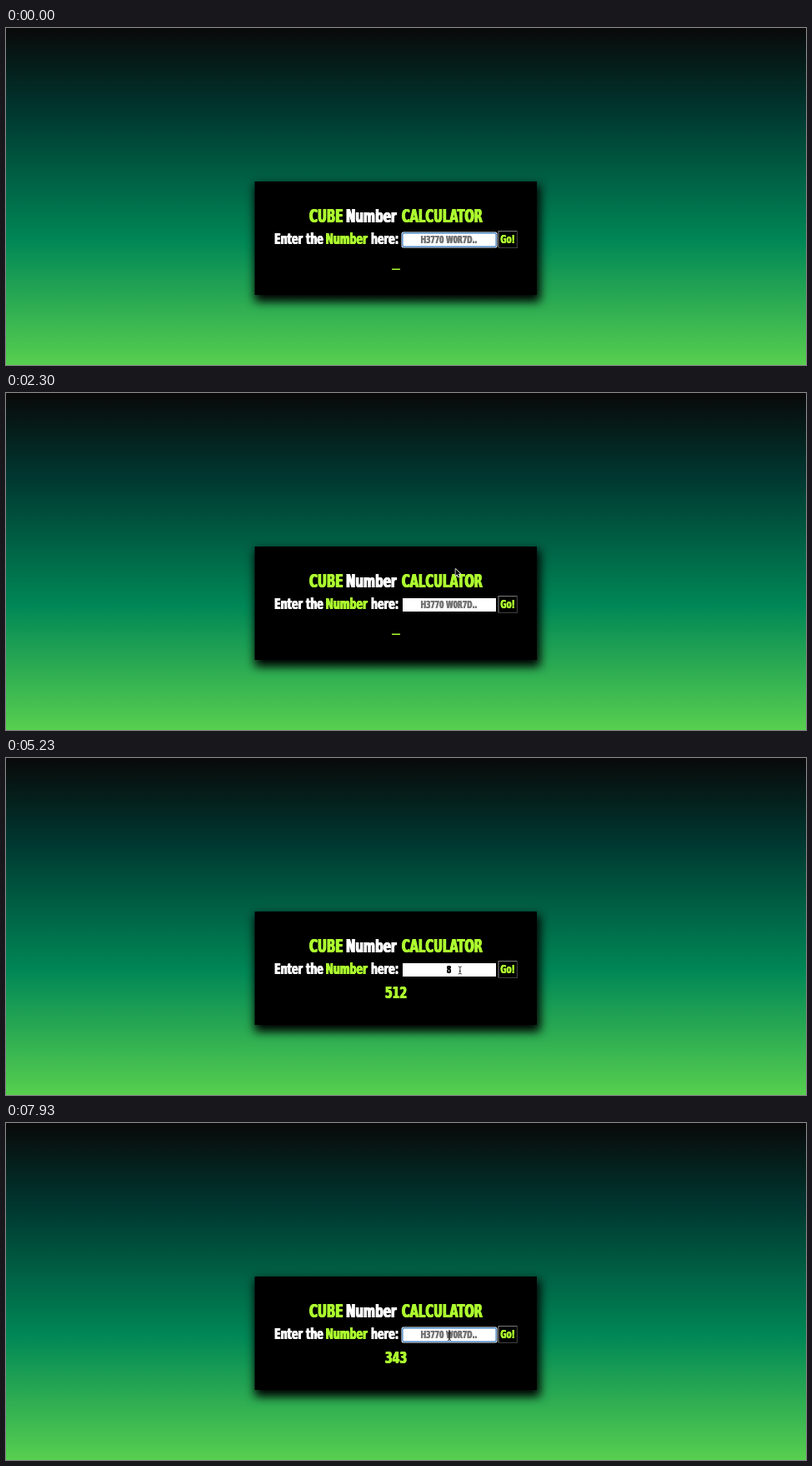
An HTML page with a canvas for the animation above (8000 ms loop, 960 px wide and 404 px high).

```html
<!DOCTYPE html>
<html lang="en">
<head>
<meta charset="utf-8">
<title>Cube Number Calculator</title>
<style>
  html, body { margin: 0; width: 100%; height: 100%; overflow: hidden; background: #000; }
  canvas { display: block; width: 960px; height: 404px; }
</style>
</head>
<body>
<canvas id="stage" width="960" height="404"></canvas>
<script>
const ctx = document.getElementById("stage").getContext("2d");
const LOOP = 8000;
const KEY_TIME = 100;
const PRESS_TIME = 75;
const LIME = "#adff2f";
const CONDENSE = 0.63;
const FIELD_CENTER = 531.5;

// Resting points of the pointer.
const FIELD = { x: 532, y: 256 };
const GO = { x: 599, y: 248 };
const OK = { x: 569, y: 33 };

// Moments of a rejected entry, as parts of the time from Go to the field.
const ALERT = { open: 0.08, leave: 0.11, arrive: 0.45, press: 0.47, release: 0.52, close: 0.73 };

// Every round types an entry, clicks Go and comes back to the field.
const rounds = [
  { entry: "Hey", type: 470, go: 1130, back: 2400 },
  { entry: "5", type: 2800, go: 3030, back: 3400 },
  { entry: "3", type: 3570, go: 3850, back: 4230 },
  { entry: "8", type: 4490, go: 4850, back: 5350 },
  { entry: "7", type: 5530, go: 5800, back: 6060 },
  { entry: "hello", type: 6370, go: 7030, back: 7700 }
];

const isNumber = round => !isNaN(round.entry);
const within = (v, from, to) => v >= from && v < to;
const tripOf = (round, t) => (t - round.go) / (round.back - round.go);

function ease(t, from, to) {
  const u = Math.min(1, Math.max(0, (t - from) / (to - from)));
  return u * u * (3 - 2 * u);
}

function stateAt(t) {
  const round = rounds.findLast(r => t >= r.type);
  if (!round) return { value: "", result: "", focus: true, since: -500 };
  const { entry, type, go, back } = round;
  const numeric = isNumber(round);
  const trip = tripOf(round, t);
  const typed = Math.min(entry.length, 1 + Math.floor((t - type) / KEY_TIME));
  const solved = rounds.findLast(r => isNumber(r) && t >= r.go + PRESS_TIME);
  return {
    value: !numeric && trip >= ALERT.close ? "" : entry.slice(0, typed),
    result: solved ? String(solved.entry ** 3) : "",
    focus: t < go || t >= back,
    since: t >= back ? back : type + (typed - 1) * KEY_TIME,
    selected: numeric && t >= back,
    pressed: t >= go && (numeric ? t < go + PRESS_TIME : trip < ALERT.close),
    dialog: !numeric && within(trip, ALERT.open, ALERT.close),
    okDown: within(trip, ALERT.press, ALERT.release)
  };
}

function glide(from, to, k, bulge = 0) {
  return {
    x: from.x + (to.x - from.x) * k + bulge * Math.sin(Math.PI * k),
    y: from.y + (to.y - from.y) * k
  };
}

// The pointer is hidden while keys are being typed.
function pointerAt(t) {
  const round = rounds.findLast(r => t >= r.type);
  if (!round) return null;
  const lastKey = round.type + (round.entry.length - 1) * KEY_TIME;
  const leave = lastKey + (round.go - lastKey) * 0.4;
  if (t < leave) return null;
  if (t < round.go) return glide(FIELD, GO, ease(t, leave, round.go));
  if (isNumber(round)) return glide(GO, FIELD, ease(t, round.go + PRESS_TIME, round.back));
  const trip = tripOf(round, t);
  return trip < ALERT.close
    ? glide(GO, OK, ease(trip, ALERT.leave, ALERT.arrive), 57)
    : glide(OK, FIELD, ease(trip, ALERT.close, 1));
}

function rect(x, y, w, h, color, radius = 0) {
  ctx.fillStyle = color;
  ctx.beginPath();
  ctx.roundRect(x, y, w, h, radius);
  ctx.fill();
}

function blurred(radius, draw) {
  ctx.filter = `blur(${radius}px)`;
  draw();
  ctx.filter = "none";
}

// Heavy condensed lettering, thickened sideways only; returns its width.
function poster(text, x, y, size, color, align = "left") {
  ctx.font = `bold ${size}px "DejaVu Sans", sans-serif`;
  ctx.textAlign = align;
  ctx.fillStyle = color;
  for (const shift of [-1, 0, 1]) {
    ctx.save();
    ctx.translate(x + shift * size * 0.03, y);
    ctx.scale(CONDENSE, 1);
    ctx.fillText(text, 0, 0);
    ctx.restore();
  }
  return ctx.measureText(text).width * CONDENSE;
}

function plain(text, x, y, font, color, align = "left") {
  ctx.font = `${font} Roboto, "Liberation Sans", sans-serif`;
  ctx.textAlign = align;
  ctx.fillStyle = color;
  ctx.fillText(text, x, y);
}

function drawBackdrop() {
  const sky = ctx.createLinearGradient(0, 0, 0, 404);
  sky.addColorStop(0, "#090909");
  sky.addColorStop(0.25, "#003730");
  sky.addColorStop(0.63, "#008756");
  sky.addColorStop(1, "#57cf4f");
  ctx.fillStyle = sky;
  ctx.fillRect(0, 0, 960, 404);
  blurred(6, () => rect(298.5, 188, 342.5, 140, "#000"));
  rect(298.5, 184, 338.5, 136, "#000");
}

function drawField(state, t) {
  if (state.focus) {
    rect(474.5, 244.5, 115, 19, "#fff", 2.5);
    rect(475.3, 245.3, 113.4, 17.4, "#2f74bd", 2);
    rect(476.5, 246.5, 111, 15, "#fff", 1);
  } else {
    rect(476, 246, 112, 16, "#fff");
  }
  if (state.selected) rect(527.5, 247, 8, 14, "#b4d5fe");
  const empty = !state.value;
  const width = poster(state.value || "H3770 W0R7D..", FIELD_CENTER, 258, 12.2,
    empty ? "#757575" : "#000", "center");
  const blinkOn = (t - state.since) % 1000 < 500;
  if (state.focus && !state.selected && blinkOn && t > state.since && state.since > 0) {
    rect(FIELD_CENTER + (empty ? 0 : width / 2), 248, 0.9, 12, "#000");
  }
}

function drawButton(pressed) {
  const [upper, lower] = pressed ? ["#3a3a3a", "#767676"] : ["#767676", "#3a3a3a"];
  rect(590.5, 243, 23.5, 21, lower);
  rect(590.5, 243, 22.4, 19.9, upper);
  rect(591.6, 244.1, 21.3, 18.8, "#000");
  poster("Go!", 602, 258, 14, LIME, "center");
}

function drawPanel(state, t) {
  poster("CUBE", 364, 233, 21.5, LIME);
  poster("Number", 408, 233, 21.5, "#fff");
  poster("CALCULATOR", 475, 233, 21, LIME);
  poster("Enter the", 322, 258.5, 17.8, "#fff");
  poster("Number", 383.5, 258.5, 17.8, LIME);
  poster("here:", 438, 258.5, 17.8, "#fff");
  drawField(state, t);
  drawButton(state.pressed);
  if (state.result) poster(state.result, 468, 288, 20, LIME, "center");
  else rect(463, 288.5, 10, 1.5, LIME);
}

function drawDialog(okDown) {
  blurred(3, () => rect(338.5, -2, 258.5, 56, "rgba(0,0,0,.6)"));
  rect(338.5, -4, 258.5, 56, "#292a2d", 3);
  plain("Not a Number!", 348, 12, "8px", "#e8eaed");
  rect(551, 24, 37, 19, okDown ? "#a1c3f9" : "#8ab4f8", 2);
  plain("OK", 569.5, 36, "500 7.5px", "#202124", "center");
}

function drawPointer({ x, y }) {
  const inField = within(x, 476, 588) && within(y, 246, 262);
  ctx.save();
  ctx.translate(x, y);
  ctx.lineJoin = "round";
  if (inField) {
    ctx.strokeStyle = "#222";
    ctx.lineWidth = 0.9;
    ctx.stroke(new Path2D("M-2 -4.5Q0 -4.5 0 -3.2Q0 -4.5 2 -4.5M0 -3.2V3.2M-2 4.5Q0 4.5 0 3.2Q0 4.5 2 4.5M-1 1H1"));
  } else {
    const arrow = new Path2D("M0 0V8.2L1.9 6.4L3.2 9.5L4.6 8.9L3.3 5.9H5.9Z");
    ctx.strokeStyle = "#fff";
    ctx.lineWidth = 1.5;
    ctx.stroke(arrow);
    ctx.fillStyle = "#000";
    ctx.fill(arrow);
  }
  ctx.restore();
}

function frame() {
  const t = performance.now() % LOOP;
  const state = stateAt(t);
  const pointer = pointerAt(t);
  drawBackdrop();
  drawPanel(state, t);
  if (state.dialog) drawDialog(state.okDown);
  if (pointer) drawPointer(pointer);
  requestAnimationFrame(frame);
}
frame();
</script>
</body>
</html>
```
